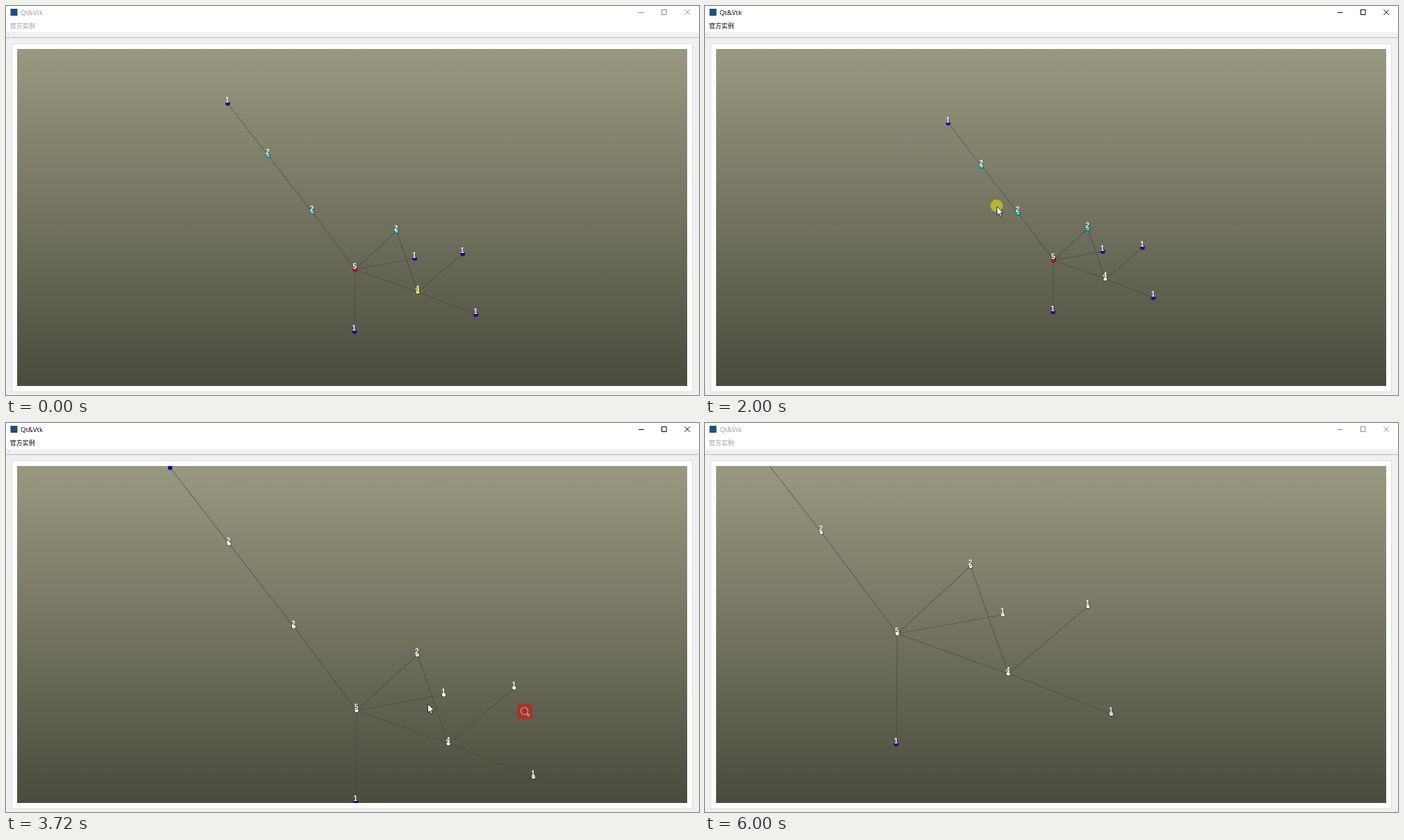
An HTML page with a canvas that plays this animation: 998 by 561 pixels, repeating every 6080 ms.

```html
<!DOCTYPE html>
<html lang="zh">
<head>
<meta charset="utf-8">
<title>Qt&amp;Vtk</title>
<style>
html, body { margin: 0; width: 100%; height: 100%; overflow: hidden; background: #f0f0f0; }
canvas { display: block; }
</style>
</head>
<body>
<canvas id="stage" width="998" height="561"></canvas>
<script>
const ctx = document.getElementById('stage').getContext('2d');
const LOOP = 6080, STEP = 40, LAG = 80;
const VIEW = { x: 16, y: 62, w: 965, h: 486 };
const CENTER = { x: 498, y: 304.5 };
const COLORS = { 1: '#0000dc', 2: '#00f5ff', 4: '#ffff00', 5: '#f50000' };

// Tree of nodes; one more edge closes the triangle.
const nodes = [
  { x: 502.8, y: 379.7 },
  { x: 441, y: 297.2, parent: 0 },
  { x: 377.2, y: 215.3, parent: 1 },
  { x: 319.3, y: 140.5, parent: 2 },
  { x: 501.9, y: 469.6, parent: 0 },
  { x: 588.6, y: 364.3, parent: 0 },
  { x: 562.4, y: 324.8, parent: 0 },
  { x: 593, y: 412.3, parent: 0 },
  { x: 657.8, y: 357.5, parent: 7 },
  { x: 676.7, y: 445, parent: 7 }
];
const edges = nodes.map((n, i) => [n.parent, i]).slice(1).concat([[6, 7]]);
nodes.forEach((n, i) => { n.degree = edges.filter(e => e.includes(i)).length; });

// Cursor stops: arrival time, departure time, x, y
const stops = [
  [160, 160, 800, 477], [640, 680, 720, 416], [800, 800, 580, 410],
  [840, 1400, 573, 402], [1720, 1880, 287, 198], [2000, 2000, 420, 289],
  [2400, 2840, 737, 438], [3360, 4000, 607, 405], [4280, 4280, 559, 381],
  [4440, 4440, 555, 358], [4840, 5080, 329.5, 247], [5720, 5720, 1000, 568]
];
const CLICK = 800;
const BAND = { from: 1720, to: 2400 };
const PAN = { from: 4280, to: 4920 };

const clamp = (v, lo, hi) => Math.min(hi, Math.max(lo, v));
const within = (t, a, b) => t >= a && t < b;

function cursorAt(t) {
  const i = stops.findIndex(s => t < s[0]);
  if (i === 0) return stops[0].slice(2);
  if (i < 0) return stops[stops.length - 1].slice(2);
  const [, leave, x0, y0] = stops[i - 1], [arrive, , x1, y1] = stops[i];
  const k = clamp((t - leave) / (arrive - leave), 0, 1);
  return [x0 + (x1 - x0) * k, y0 + (y1 - y0) * k];
}

function zoomAt(t) {
  if (t < 1000) return 1;
  const notch = t < 1400 ? -2 : t < 2800 ? -1 : clamp(Math.floor((t - 3440) / 120), -2, 3);
  return 1.21 ** notch;
}

function panAt(t) {
  const [x0, y0] = cursorAt(PAN.from);
  const [x, y] = cursorAt(clamp(t - LAG, PAN.from, PAN.to));
  return [x - x0, y - y0];
}

function place(t) {
  const s = zoomAt(t), [px, py] = panAt(t);
  return nodes.map(n => [
    CENTER.x + (n.x - CENTER.x) * s + px,
    CENTER.y + (n.y - CENTER.y) * s + py
  ]);
}

function pickNodes() {
  const [cx, cy] = cursorAt(CLICK);
  const [x0, y0] = cursorAt(BAND.from), [x1, y1] = cursorAt(BAND.to);
  const banded = place(BAND.to);
  nodes.forEach((n, i) => {
    const [x, y] = banded[i];
    const inBand = within(x, x0, x1) && within(y, y0, y1);
    const clicked = Math.hypot(n.x - cx, n.y - cy) < 16;
    n.picked = clicked ? CLICK + STEP : inBand ? BAND.to : Infinity;
  });
}

function rect(x, y, w, h, color) {
  ctx.fillStyle = color;
  ctx.fillRect(x, y, w, h);
}

function line(x0, y0, x1, y1) {
  ctx.beginPath();
  ctx.moveTo(x0, y0);
  ctx.lineTo(x1, y1);
  ctx.stroke();
}

function ring(x, y, r) {
  ctx.beginPath();
  ctx.arc(x, y, r, 0, Math.PI * 2);
  ctx.stroke();
}

function disc(x, y, r, color) {
  ctx.beginPath();
  ctx.arc(x, y, r, 0, Math.PI * 2);
  ctx.fillStyle = color;
  ctx.fill();
}

function drawWindow(active) {
  rect(0, 0, 998, 561, '#f0f0f0');
  rect(0, 0, 998, 37.5, '#fff');
  rect(0, 45, 998, 1, '#b8b8b8');
  rect(3, 41, 1.5, 1, '#aaa');
  rect(8, 54, 981, 503, '#dcdcdc');
  rect(9, 55, 979, 501, '#fff');
  rect(6.5, 4, 10, 10, '#1d4f7c');

  ctx.textAlign = 'left';
  ctx.fillStyle = active ? '#000' : '#999';
  ctx.font = '9.6px "Open Sans", sans-serif';
  ctx.fillText('Qt&Vtk', 21, 12.5);
  ctx.font = '9px "Noto Sans CJK SC", "Noto Sans CJK", sans-serif';
  ctx.fillText('官方实例', 5.7, 32.3);

  ctx.strokeStyle = active ? '#000' : '#8a8a8a';
  ctx.lineWidth = 1;
  line(911, 9.5, 918.5, 9.5);
  ctx.strokeRect(944.5, 5.5, 6.5, 7);
  line(977.5, 5.3, 985, 12.8);
  line(985, 5.3, 977.5, 12.8);
}

function drawGraph(t) {
  const pts = place(t);
  ctx.strokeStyle = 'rgba(64,64,64,0.55)';
  ctx.lineWidth = 1.1;
  for (const [a, b] of edges) line(...pts[a], ...pts[b]);

  nodes.forEach((n, i) => {
    disc(...pts[i], 3.3, 'rgba(10,10,10,0.85)');
    disc(...pts[i], 2.7, t >= n.picked ? '#fff' : COLORS[n.degree]);
  });

  ctx.font = 'bold 10px "Liberation Sans", Arial, sans-serif';
  ctx.textAlign = 'center';
  nodes.forEach((n, i) => {
    const [x, y] = pts[i];
    if (y < VIEW.y + 9) return;
    ctx.fillStyle = 'rgba(0,0,0,0.4)';
    ctx.fillText(n.degree, x + 0.2, y - 0.6);
    ctx.fillStyle = '#fff';
    ctx.fillText(n.degree, x - 0.5, y - 1.2);
  });
}

function drawBand(t) {
  if (!within(t, BAND.from + LAG, BAND.to)) return;
  const [x0, y0] = cursorAt(BAND.from), [x, y] = cursorAt(t - LAG);
  if (x - x0 < 1) return;
  ctx.strokeStyle = 'rgba(125,125,150,0.45)';
  ctx.lineWidth = 1;
  ctx.strokeRect(x0 + 0.5, y0 - 0.5, x - x0, y - y0);
}

function drawLens(x, y, alpha) {
  ctx.save();
  ctx.globalAlpha = alpha;
  ctx.translate(x, y);
  ctx.beginPath();
  ctx.roundRect(-10.8, -10.8, 21.6, 21.6, 2);
  ctx.fillStyle = '#ca1c1c';
  ctx.fill();
  ctx.strokeStyle = '#f0d0cc';
  ctx.lineWidth = 1.2;
  ring(-0.8, -0.8, 5.2);
  line(2.9, 2.9, 4, 4);
  ring(5, 5, 1.4);
  ctx.restore();
}

function drawCursor(t) {
  if (!within(t, 160, 5720)) return;
  const [x, y] = cursorAt(t);
  if (within(t, CLICK, CLICK + STEP) || within(t, BAND.from, BAND.to)) {
    disc(x, y - 1, 9, 'rgba(196,192,40,0.85)');
  }
  if (within(t, PAN.from, PAN.to)) disc(x - 0.7, y - 1, 9, 'rgba(48,186,178,0.92)');
  ctx.save();
  ctx.translate(x + 0.5, y);
  ctx.scale(1.1, 1.1);
  ctx.beginPath();
  [[0, 0], [0, 11.6], [2.6, 9.2], [4.4, 13.2], [6.2, 12.4], [4.5, 8.6], [8, 8.4]]
    .forEach(p => ctx.lineTo(...p));
  ctx.closePath();
  ctx.fillStyle = '#fff';
  ctx.fill();
  ctx.strokeStyle = '#111';
  ctx.lineWidth = 0.8;
  ctx.stroke();
  ctx.restore();
}

const sky = ctx.createLinearGradient(0, VIEW.y, 0, VIEW.y + VIEW.h);
sky.addColorStop(0, 'rgb(153,153,128)');
sky.addColorStop(1, 'rgb(75,75,62)');

function draw(t) {
  drawWindow(within(t, 320, 5880));
  ctx.save();
  ctx.beginPath();
  ctx.rect(VIEW.x, VIEW.y, VIEW.w, VIEW.h);
  ctx.clip();
  rect(VIEW.x, VIEW.y, VIEW.w, VIEW.h, sky);
  drawGraph(t);
  drawBand(t);
  ctx.restore();
  if (within(t, 840, 1640)) drawLens(590.3, 388, 0.96);
  if (within(t, 2480, 6000)) drawLens(747.3, 416.2, 1 - (t - 2480) / 3600);
  drawCursor(t);
}

function frame() {
  const t = performance.now() % LOOP;
  draw(Math.floor(t / STEP) * STEP);
  requestAnimationFrame(frame);
}
pickNodes();
frame();
</script>
</body>
</html>
```
